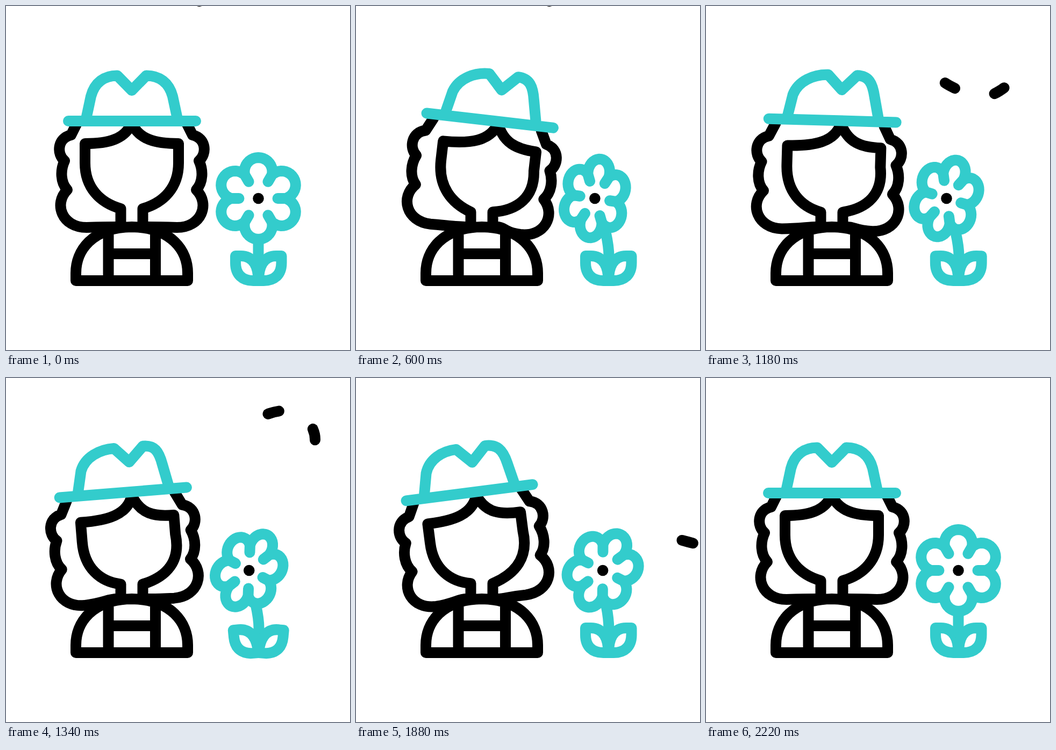
An HTML page for the animation above (2.4 s loop, 640 by 640 pixels).

```html
<!DOCTYPE html>
<html lang="en">
<head>
<meta charset="utf-8">
<title>Gardener and flower</title>
<style>
  html, body { margin: 0; width: 100%; height: 100%; overflow: hidden; background: #fff; }
  svg { display: block; width: 100vw; height: 100vh; }
  path { fill: none; stroke: #000; stroke-width: 20; stroke-linecap: round; stroke-linejoin: round; }
  .teal { stroke: #33cccc; }
</style>
</head>
<body>
<svg viewBox="0 0 640 640">
  <path id="hair"/>
  <path id="face"/>
  <path d="M130 511V497C130 455 160 412 234 411C308 412 338 455 338 497V511ZM190.500 420V511M278 420V511M190.500 461H278"/>
  <path id="hat" class="teal"/>
  <path id="stem" class="teal"/>
  <path id="leafL" class="teal" d="M427 465V478C427 500 440 511 460 511H469.500C469.500 482 458 465 437 465Z"/>
  <path id="leafR" class="teal" d="M512.500 465V478C512.500 500 499.500 511 479.500 511H470C470 482 481.500 465 502.500 465Z"/>
  <path id="petals" class="teal"/>
  <circle id="dot" cy="358" r="10.300"/>
  <path id="bees" stroke-dasharray="21 77 21 3000"
    d="M352-48C362 25 400 120 453 148C480 162 512 180 546 158C572 143 582 118 570 93C556 61 520 55 490 66C445 82 424 132 420 172C420 200 438 223 464 241C508 271 560 290 618 305C645 312 670 318 700 325"/>
</svg>
<script>
const LOOP = 2400;
const el = id => document.getElementById(id);
const draw = (id, d) => el(id).setAttribute('d', d);
const pt = (x, y) => x.toFixed(2) + ' ' + y.toFixed(2) + ' ';
const rad = deg => deg * Math.PI / 180;

const progress = (t, from, to) => Math.min(1, Math.max(0, (t - from) / (to - from)));
const ease = (t, from, to) => {
  const u = progress(t, from, to);
  return u * u * (3 - 2 * u);
};
const pulse = (t, from, to) => Math.sin(Math.PI * progress(t, from, to)) ** 2;

// Both poses are offsets from rest: rest -> RIGHT -> LEFT -> rest
const RIGHT = { tilt: 6.8, sway: 15.2, turn: 16.3, drift: -26, spin: 9, squash: .23 };
const LEFT = { tilt: -9.5, sway: -30.5, turn: 16.6, drift: -13.5, spin: 35, squash: .2 };

function poseAt(t) {
  const first = ease(t, 200, 650), second = ease(t, 950, 1565), back = ease(t, 1730, 2215);
  const pose = {};
  for (const key in RIGHT) {
    pose[key] = RIGHT[key] * (first - second) + LEFT[key] * (second - back);
  }
  return pose;
}

function drawHead({ tilt, sway, turn }) {
  const cos = Math.cos(rad(tilt)), sin = Math.sin(rad(tilt));
  const cx = 234.5 + sway, cy = 214 - .06 * turn;
  // kx, ky: how far the point slides as the head turns
  const head = (x, y, kx, ky) => {
    const dx = x - 234.5, dy = y - 214;
    return pt(cx + dx * cos - dy * sin + kx * turn, cy + dx * sin + dy * cos + ky * turn);
  };
  let hair = '', face = '', hat = 'M' + head(116, 214, 0, 0) + 'L' + head(353, 214, 0, 0);

  // The drawing is symmetric at rest, so each half is built outward from the middle
  for (const s of [-1, 1]) {
    const fixed = (x, y) => pt(234 + s * x, y);
    const at = (x, y, kx, ky) => head(234 + s * x, y, kx, ky);
    const h = (x, y) => at(x, y, -.25, .36);
    const f = (x, y) => at(x, y, .3, .42);
    const cheek = (x, y) => at(x, y, .5 + .2 * s, .6);
    const c = (x, y, kx) => at(x, y, kx, 0);

    hair += 'M' + h(101, 216) + 'L' + h(113, 240)
      + 'C' + h(139, 246) + h(140, 276) + h(125, 288)
      + 'C' + h(133, 305) + h(133, 328) + h(120, 342)
      + 'C' + h(146, 368) + h(130, 412) + h(84, 412)
      + 'C' + h(51, 411) + fixed(44, 411) + fixed(28, 411);

    face += 'M' + fixed(20.5, 411) + 'L' + fixed(20.5, 377 + .4 * turn)
      + 'C' + cheek(59, 366) + cheek(87, 338) + f(87, 292) + 'L' + f(87, 256)
      + 'C' + at(44, 256, .7, .42) + at(12, 248, 1.1, .42) + at(0, 217, 1, .15);

    hat += 'M' + c(85, 210, .08) + 'L' + c(76, 168, .1)
      + 'C' + c(69, 142, .25) + c(51, 129.5, .9) + c(27, 129.5, 1.05)
      + 'L' + c(0, 157, 1);
  }
  draw('hair', hair);
  draw('face', face);
  draw('hat', hat);
}

function drawFlower({ drift, spin, squash, turn }) {
  const cx = 469.5 + drift, bend = turn / 16, STEPS = 20;
  const rotate = (x, y, a) => [x * Math.cos(a) - y * Math.sin(a), x * Math.sin(a) + y * Math.cos(a)];
  let petals = '';
  for (let i = 0; i < 6; i++) {
    const p = (x, y) => {
      const [u, v] = rotate(x, y, i * Math.PI / 3);
      const [X, Y] = rotate(u * (1 - squash), v * (1 - squash / 8), rad(spin));
      return pt(cx + X, 358 + Y);
    };
    petals += 'M' + p(-18, -31.2);
    for (let j = 0; j <= STEPS; j++) {
      const a = rad(166 + 208 * j / STEPS);
      petals += 'L' + p(26 * Math.cos(a), -50 + 26 * Math.sin(a));
    }
  }
  draw('petals', petals);
  el('dot').setAttribute('cx', cx);
  draw('stem', 'M' + pt(469.5 - 5 * bend, 434 - 13 * bend) + 'Q'
    + pt(469.5 + 1.5 * bend, 450) + pt(469.5 + bend, 470) + 'L469.5 511');
}

function drawLeaves(t) {
  const lean = 21.5 * (pulse(t, 600, 1200) + pulse(t, 1230, 1890));
  el('leafL').setAttribute('transform', `rotate(${-lean} 469.5 511)`);
  el('leafR').setAttribute('transform', `rotate(${lean} 470 511)`);
}

function frame() {
  const t = performance.now() % LOOP, pose = poseAt(t);
  drawHead(pose);
  drawFlower(pose);
  drawLeaves(t);
  el('bees').setAttribute('stroke-dashoffset', 79 - 1023 * ease(t, 663, 2119));
  requestAnimationFrame(frame);
}
frame();
</script>
</body>
</html>
```
